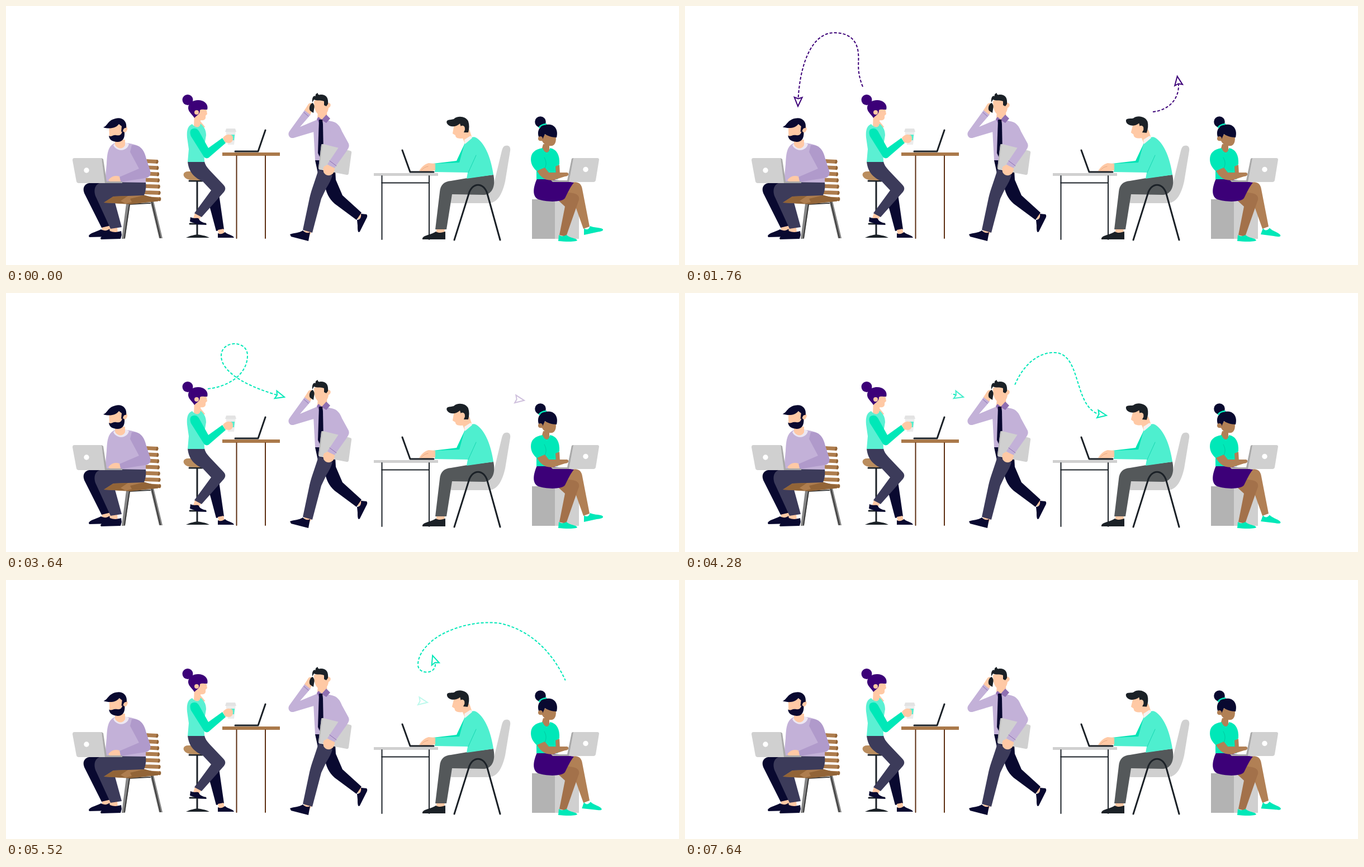
These frames come from a looping animation (1204 px wide and 465 px high, 7.68 s). An HTML page:

```html
<!DOCTYPE html>
<html lang="en">
<head>
<meta charset="utf-8">
<title>People at work</title>
<style>
html, body { margin: 0; width: 100%; height: 100%; overflow: hidden; background: #fff; }
svg { display: block; width: 100vw; height: 100vh; }
.navy { fill: #090930; } .slate { fill: #3c3b5a; } .ink { fill: #1b2127; } .ash { fill: #54585a; }
.skin { fill: #ffc9a5; } .tan { fill: #b18055; } .tan2 { fill: #a3714a; }
.lilac { fill: #c3b1d8; } .lilac2 { fill: #b09acb; } .mint { fill: #4eefcf; } .teal { fill: #00e8b8; }
.violet { fill: #3c0078; } .gray { fill: #d0d0d0; } .gray2 { fill: #b3b3b3; } .wood { fill: #ae7d4e; } .wood2 { fill: #926437; }
.line { fill: none; stroke-linecap: round; stroke-linejoin: round; }
</style>
</head>
<body>
<svg viewBox="0 0 1204 465" preserveAspectRatio="none">

<!-- man on the bench -->
<g>
  <path fill="#858585" d="M215 355H222L213 418H207ZM258 350H264L280 417H274Z"/>
  <path class="line" stroke="#3a3a3a" stroke-width="2" d="M212 416L221 356L258 354M261 352L276 416"/>
  <g id="slats" class="wood"></g>
  <path class="wood2" d="M174 353L192 341L240 337L276 348L268 351L222 356Z"/>
  <path class="skin" d="M170 393L184 391L186 405L173 406ZM184 396L199 395L200 409L185 410Z"/>
  <path class="navy" d="M148 413C149 408 160 406 170 401C176 404 181 404 185 400L188 414L149 415Z"/>
  <path class="navy" d="M169 417C171 411 182 410 186 404C193 407 200 406 206 404L207 411L205 418L170 419Z"/>
  <path class="navy" d="M176 317H154C141 318 136 325 140 336L171 398L192 393L181 335Z"/>
  <path class="slate" d="M250 316H174C160 318 156 328 160 341L187 400L207 397L195 353L190 344L246 341C250 335 251 325 250 316Z"/>
  <path class="wood" d="M175 353L192 342L246 340L236 349L214 355Z"/>
  <path class="wood2" d="M175 353L192 342L218 341L205 350L214 355Z"/>
  <path class="wood2" d="M222 346L246 340L276 346L271 351L252 348L240 354H226Z"/>
  <path class="lilac" d="M195 246C183 251 181 262 180 284L177 316L250 317L251 280C250 258 240 249 217 246Z"/>
  <path class="lilac2" d="M225 250C239 248 245 257 249 268L258 296C260 304 256 308 249 309L205 316L203 307L238 292L222 262Z"/>
  <path fill="#ece7f3" d="M192 250C196 243 213 242 220 248C216 262 198 262 192 250Z"/>
  <path class="skin" d="M195 240H213V250C209 258 199 257 195 249Z"/>
  <path class="skin" d="M205 315C199 319 188 317 183 313C187 307 194 303 203 306Z"/>
  <g id="benchHead">
    <path class="skin" d="M184 213H211C216 216 219 219 216 224C215 227 212 227 211 228L209 240C203 246 189 243 185 235Z"/>
    <path class="navy" d="M174 218C182 215 182 205 196 202C208 199 217 207 215 219C212 218 210 220 209 225L206 226L207 216L202 212C196 220 185 221 174 218Z"/>
    <path class="navy" d="M208 224L212 227C213 240 206 245 198 244C189 243 185 240 184 233C189 236 191 231 197 232C203 233 207 232 208 224Z"/>
  </g>
  <path class="gray" d="M122 273H171L178 318H130Q127 318 126 315L119 277Q119 273 122 273Z"/>
  <path fill="#a9a9a9" d="M171 273L174 275L180 315H208V318H177Z"/>
  <circle cx="144" cy="295" r="4.700" fill="#fff"/>
</g>

<!-- woman with a cup -->
<g>
  <path class="line" stroke="#1b2127" stroke-width="3" d="M342 314V413M329 391H357M328 314H351"/>
  <path class="ink" d="M322 416C330 412 338 411 342 410C347 411 357 412 364 416Z"/>
  <path class="navy" d="M360 345L381 338L390 401L376 404L367 370Z"/>
  <path class="skin" d="M379 402L389 400L391 409L381 411ZM338 372L349 378L344 386L335 381Z"/>
  <path class="navy" d="M379 416V408C385 411 388 408 392 406C397 411 406 411 408 416Z"/>
  <path fill="#ba8d5e" d="M326 297C317 297 315 304 321 309C326 313 335 313 352 313L344 297Z"/>
  <path class="slate" d="M325 279H355C357 288 362 292 372 303L389 321C394 326 393 331 388 336L350 379L337 372L367 331L352 315C338 308 327 300 325 279Z"/>
  <path class="navy" d="M330 379C337 383 342 379 345 382C347 389 357 388 359 393L343 392L329 387Z"/>
  <path class="skin" d="M337 192H349L348 207L356 217C351 222 342 223 336 218Z"/>
  <path fill="#5bf0d3" d="M333 212C325 215 323 224 324 236L327 257L325 280H355L354 256L358 232C358 221 353 216 348 211C347 219 340 220 333 212Z"/>
  <path class="teal" d="M331 222C338 217 344 221 347 228L362 255L387 237L393 246L363 272C359 275 355 273 353 269L331 234C329 229 329 225 331 222Z"/>
  <path class="skin" d="M342 183H358L360 194L357 197C358 205 354 206 345 205L338 197Z"/>
  <circle class="violet" cx="325" cy="168.500" r="9.500"/>
  <path class="violet" d="M326 184C325 168 349 165 357 174C361 178 361 183 360 186C353 186 349 185 347 187C347 194 343 195 337 201C333 194 327 191 326 184Z"/>
  <circle class="skin" cx="341" cy="191" r="4"/>
  <path fill="#ececec" d="M393 223H411L408 249H397Z"/>
  <path fill="#e3e3e3" d="M394 220H410L412 226H392Z"/>
  <path class="mint" d="M398 231H409L408 241H399Z"/>
  <path class="skin" d="M388 237C392 230 401 229 405 233C407 239 406 245 399 246L392 245Z"/>
  <path fill="#aa794a" d="M387 263H490V269H387Z"/>
  <path class="line" stroke="#5d2f12" stroke-width="2" stroke-linecap="butt" d="M412.500 269V417M464 269V417"/>
  <path class="line" stroke="#1b2127" stroke-width="3" d="M410 261H451L464 223"/>
</g>

<!-- man on the phone -->
<g>
  <path class="skin" d="M626 374L635 370L637 381L630 383ZM534 402L547 405L543 412L532 409Z"/>
  <path class="navy" d="M553 277H588L590 312L602 340L636 371L627 384L588 355C577 345 573 335 570 321L558 300Z"/>
  <path class="slate" d="M559 293L584 304C582 311 578 319 573 327L564 346L548 407L531 402L543 345C547 327 554 312 559 293Z"/>
  <path class="navy" d="M635 373L645 374C648 377 645 381 643 385L633 405C629 409 629 400 629 394L628 384C633 384 636 380 635 373Z"/>
  <path class="navy" d="M508 410C516 407 524 408 531 403C536 408 540 408 544 406L541 422L510 414Z"/>
  <path class="lilac" d="M557 203C552 207 550 214 550 222L553 277H590L601 236C599 218 594 209 578 206Z"/>
  <path class="lilac" d="M557 204L526 217L545 195L535 186L507 225C503 231 507 238 514 237L554 225Z"/>
  <path class="line" stroke="#8b6eb1" stroke-width="1" d="M533 191L541 198"/>
  <path class="skin" d="M534 187L541 176C545 172 551 175 552 182L544 195Z"/>
  <path class="ink" d="M544 188C541 184 544 174 549 174L552 179L550 192Z"/>
  <path class="skin" d="M558 190H574L575 203L564 208L557 201Z"/>
  <path class="skin" d="M551 171C556 167 573 168 577 174C582 174 582 181 577 183C576 192 571 197 563 196C555 195 551 186 551 171Z"/>
  <path class="ink" d="M548 173C547 165 550 160 554 162C553 159 555 157 558 156C557 159 560 160 563 159C574 159 577 166 576 176L573 180L569 178V171C562 168 556 171 551 168Z"/>
  <path fill="#8f70b2" d="M556 203L559 199L565 204L573 195L580 202L573 210L565 205L560 210Z"/>
  <path class="navy" d="M560 204L566 204L567 212L568 265L563 275L558 264Z"/>
  <path class="gray" d="M568 248L616 260Q619 261 618 264L613 301Q612 304 609 303L562 294Q558 293 559 290L564 250Q565 247 568 248Z"/>
  <path class="line" stroke="#b9b9b9" stroke-width="2" d="M565 249L560 291"/>
  <path class="lilac" d="M581 207C593 208 598 217 601 225L613 247C615 253 612 256 609 261L587 292L575 284L595 254L580 226Z"/>
  <path class="line" stroke="#8b6eb1" stroke-width="1" d="M579 278L591 287"/>
  <path class="skin" d="M575 285L588 291C588 301 582 305 575 304C567 302 566 293 569 288Z"/>
</g>

<!-- man at the desk -->
<g>
  <path class="gray" d="M893 251C900 249 903 253 902 260L893 315C887 341 878 354 862 354H800C790 354 787 346 788 337H850C866 337 872 325 875 310L887 260Q889 252 893 251Z"/>
  <path class="skin" d="M770 399H785L784 411H770Z"/>
  <path class="ink" d="M745 417C747 411 760 411 769 405C776 409 781 406 786 405V419H745Z"/>
  <path class="ash" d="M825 309L872 303C876 322 871 338 855 339L798 338L788 401H768L776 334C777 321 784 315 796 314Z"/>
  <path class="line" stroke="#1b2127" stroke-width="3" d="M802 420L828 337C834 316 855 316 861 337L884 420"/>
  <path fill="#00e3b4" d="M821 246L806 278L764 283L766 294L816 289L830 260Z"/>
  <path class="mint" d="M820 248C824 239 835 232 842 237C855 245 867 269 872 303L824 310L826 299L767 298L768 283L811 281Z"/>
  <path class="line" stroke="#17d7b2" stroke-width="1" d="M841 268L827 299"/>
  <path class="skin" d="M768 283L768 295C758 297 750 298 739 296C743 290 748 284 756 282Z"/>
  <path class="line" stroke="#e7a983" stroke-width="1" d="M743 295Q748 289 755 288"/>
  <path class="skin" d="M812 225L829 222L833 234L821 247Z"/>
  <path fill="#f5f3f1" d="M820 240L831 233L834 237L821 248Z"/>
  <g id="deskHead">
    <path class="skin" d="M802 211L824 208L828 224L820 237C812 239 804 238 804 232L799 229Z"/>
    <path class="ink" d="M789 211C786 203 795 205 801 203C808 196 823 198 827 207C829 213 829 220 827 227H819L821 222C821 216 817 214 814 217L812 211C805 218 793 218 789 211Z"/>
    <circle class="skin" cx="816.500" cy="219" r="4.200"/>
  </g>
  <path class="gray" d="M658 300H773V305H658Z"/>
  <path class="line" stroke="#1b2127" stroke-width="2" stroke-linecap="butt" d="M672.500 305V419M757 305V419M672 317.500H757"/>
  <path class="line" stroke="#1b2127" stroke-width="3" d="M709 259L723 298H765"/>
</g>

<!-- woman on the box -->
<g>
  <path class="gray2" d="M941 347H982V418H941Z"/>
  <path class="gray" d="M982 347H1025V418H982Z"/>
  <g id="foot"><path class="teal" d="M1034 399C1039 403 1043 401 1045 395C1053 399 1065 397 1068 401C1069 404 1063 405 1057 406L1034 411Z"/></g>
  <path class="tan" d="M1012 317C1024 314 1030 320 1031 329L1044 396L1033 400L1016 352L995 346Z"/>
  <path class="tan2" d="M1001 334C1014 336 1027 336 1025 348L1002 414L990 411L1000 360L988 349Z"/>
  <path class="teal" d="M989 411C995 415 998 413 1003 411C1008 417 1020 416 1022 421C1017 424 999 423 988 422Z"/>
  <path class="violet" d="M950 310L990 313L1016 317C1010 324 1006 333 1000 345C994 353 965 352 952 347C942 342 942 328 950 310Z"/>
  <path class="tan" d="M961 248H972V257L976 261C970 271 961 268 958 259Z"/>
  <path class="teal" d="M960 255C946 257 939 264 939 275C939 284 943 290 949 296L949 311H987L987 287L990 284C991 267 985 257 973 255C971 267 963 264 960 255Z"/>
  <path class="tan" d="M983 288L990 285L991 302L984 304Z"/>
  <path class="tan" d="M950 296L964 290L971 299L1004 299C1009 301 1006 306 1000 306L978 313C966 313 957 309 950 296Z"/>
  <path class="line" stroke="#00c9a1" stroke-width="1" d="M963 272C967 279 967 285 964 291"/>
  <path class="tan" d="M958 231L983 230C985 240 984 249 977 251C967 252 961 247 959 242C952 244 950 235 956 233Z"/>
  <circle class="navy" cx="956" cy="208" r="9.800"/>
  <path class="navy" d="M953 235C948 218 962 211 974 213C984 215 988 225 985 236C977 236 969 233 964 230L960 239Z"/>
  <path class="line" stroke="#00e8b8" stroke-width="2.500" d="M954 218Q957 213 966 212"/>
  <circle class="tan" cx="956" cy="238" r="4"/>
  <path class="gray" d="M1015 273H1058Q1061 273 1061 276L1055 313Q1054 316 1051 316H1005L1012 276Q1012 273 1015 273Z"/>
  <path fill="#a9a9a9" d="M975 313H1004L1012 274L1015 273L1007 316H978Z"/>
  <circle cx="1037" cy="293.500" r="4.700" fill="#fff"/>
</g>

<g id="trails"></g>
</svg>
<script>
const LOOP = 7680, SWING = 1200, FADE = 700;
const HEAD_SPEED = 0.44, TAIL_SPEED = 0.46;   // px per ms
const DASH = 5, STEP = 8, ARROW = 16;
const PURPLE = '#3c0078', TEAL = '#00e8b8';
const byId = id => document.getElementById(id);
const clamp = (v, lo, hi) => Math.min(hi, Math.max(lo, v));

function add(parent, tag, attrs) {
  const el = document.createElementNS('http://www.w3.org/2000/svg', tag);
  for (const key in attrs) el.setAttribute(key, attrs[key]);
  return parent.appendChild(el);
}

for (let i = 0; i < 7; i++) {
  const x = 251 - i * 1.3, y = 275 + i * 11.2, r = 271 + i * 0.8;
  add(byId('slats'), 'path', { d: `M${x} ${y}L${r} ${y + 1}Q${r + 3} ${y + 4} ${r} ${y + 8}L${x + 2} ${y + 7}Z` });
  add(byId('slats'), 'path', { class: 'wood2', d: `M${r - 1} ${y + 1}H${r}Q${r + 3} ${y + 4} ${r} ${y + 8}L${r - 3} ${y + 7.5}Z` });
}

// start: head leaves, tail: line begins to vanish, fade: arrow begins to vanish
const trails = [
  { color: PURPLE, start: 0, tail: 725, fade: 1050,
    d: 'M661 261C630 260 620 225 620 190C620 165 623 150 618 125C610 90 585 66 550 66C525 66 508 76 493 92C465 115 420 150 372 168' },
  { color: PURPLE, start: 1050, tail: 1765, fade: 2300,
    d: 'M318 145C306 115 312 100 310 85C308 60 292 48 267 48C225 48 203 110 202 181' },
  { color: PURPLE, start: 1555, tail: 2300, fade: 3110,
    d: 'M837 190C865 187 883 168 883 143C883 95 838 92 838 122C838 160 880 188 928 193' },
  { color: TEAL, start: 2900, tail: 3645, fade: 4100,
    d: 'M361 172C400 168 432 145 432 112C432 84 385 84 385 113C385 145 440 172 499 187' },
  { color: TEAL, start: 3650, tail: 4280, fade: 5000,
    d: 'M590 165C605 130 630 107 660 107C715 107 690 220 755 220' },
  { color: TEAL, start: 4487, tail: 5414, fade: 6500,
    d: 'M1016 227C1003 165 960 95 885 78C862 74 815 76 772 102C750 117 737 135 737 152C737 170 768 170 768 152C768 120 710 80 638 80C590 80 555 105 549 152' }
];

for (const t of trails) {
  const style = { fill: 'none', stroke: t.color, 'stroke-width': 2 };
  t.line = add(byId('trails'), 'path', { ...style, d: t.d });
  t.arrow = add(byId('trails'), 'path', { ...style, fill: '#fff', d: 'M-1 0L-17 -7L-14.500 0L-17 7Z' });
  t.length = t.line.getTotalLength();
}

// Dashes stay put on the path; only those between from and to are shown.
function dashes(from, to, length) {
  const list = [0];
  let pos = 0;
  for (let s = 0; s < to; s += STEP) {
    const a = Math.max(s, from), b = Math.min(s + DASH, to);
    if (b <= a) continue;
    list.push(a - pos, b - a);
    pos = b;
  }
  list.push(length * 2);
  return list.join(' ');
}

function drawTrail(t, time) {
  const head = clamp((time - t.start) * HEAD_SPEED, 0, t.length);
  const tail = clamp((time - t.tail) * TAIL_SPEED, 0, t.length);
  const tip = head - ARROW;
  t.line.style.display = tip > tail ? '' : 'none';
  t.line.setAttribute('stroke-dasharray', dashes(tail, tip, t.length));

  // The arrow appears once it lies wholly on the path.
  const p = t.line.getPointAtLength(head);
  const back = t.line.getPointAtLength(Math.max(0, tip));
  const angle = Math.atan2(p.y - back.y, p.x - back.x) * 180 / Math.PI;
  t.arrow.setAttribute('transform', `translate(${p.x} ${p.y}) rotate(${angle})`);
  t.arrow.setAttribute('opacity', tip > 0 ? 1 - clamp((time - t.fade) / FADE, 0, 1) : 0);
}

function turn(id, angle, x, y) {
  byId(id).setAttribute('transform', `rotate(${angle} ${x} ${y})`);
}

function draw(time) {
  const sway = (1 - Math.cos(time / SWING * 2 * Math.PI)) / 2;
  turn('foot', 20 * sway, 1035, 399);
  turn('deskHead', 5 * sway, 818, 214);
  turn('benchHead', 1.5 * sway, 204, 244);
  for (const t of trails) drawTrail(t, time);
}

const begin = performance.now();
function tick() {
  draw((performance.now() - begin) % LOOP);
  requestAnimationFrame(tick);
}
tick();
</script>
</body>
</html>
```
